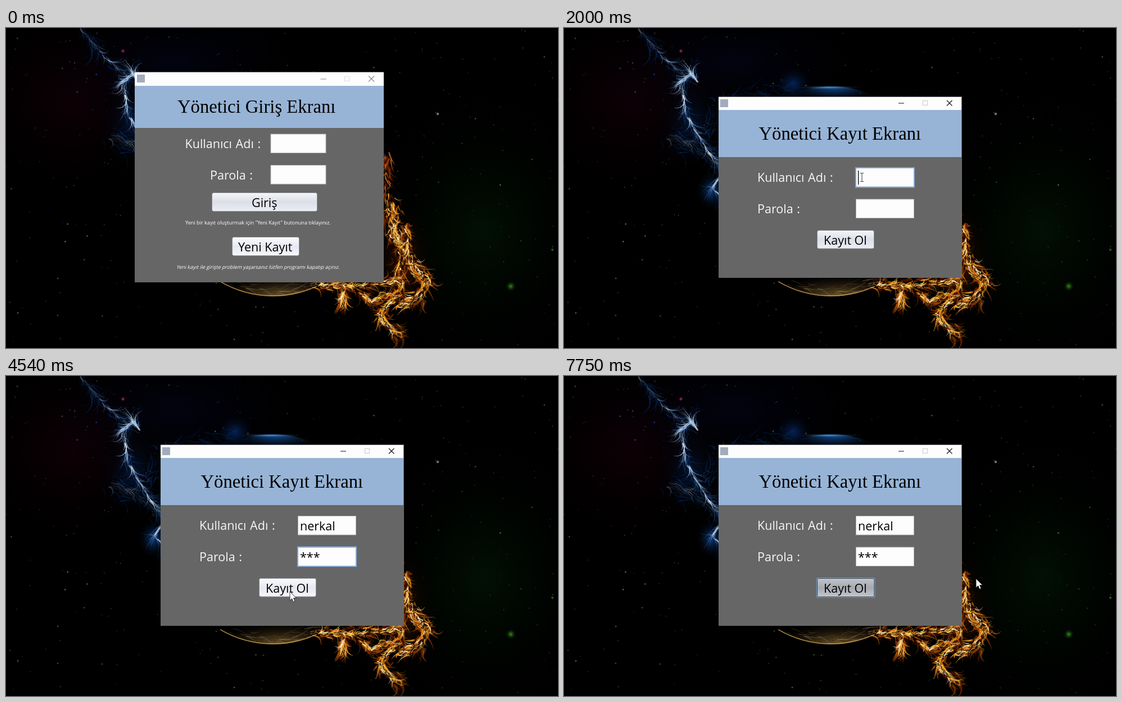
Animation, 982 px wide and 570 px high, one loop 8000 ms. Source, as an HTML page with a canvas:

```html
<!DOCTYPE html>
<html lang="tr">
<head>
<meta charset="utf-8">
<title>Yönetici Ekranı</title>
<style>
html, body { margin: 0; width: 100%; height: 100%; overflow: hidden; background: #000; }
canvas, svg { position: absolute; left: 0; top: 0; width: 982px; height: 570px; }
text { font: 21.5px "Open Sans", "Noto Sans", sans-serif; fill: #000; white-space: pre; }
.label { fill: #f6f6f6; word-spacing: 1px; }
.title { font: 32.7px "Liberation Serif", serif; }
.note { font-size: 9.15px; fill: #fff; word-spacing: 0; }
.slant { font-size: 8.93px; }
.bar { fill: #fdfdfd; }
.panel { fill: #666; }
.head { fill: #97b4d6; }
.field { fill: #fdfdfd; stroke: #b4b6bc; }
.ring { fill: none; stroke: #86a9d6; stroke-width: 2; }
.btn { fill: url(#btn); stroke: #888b95; }
.lit { fill: url(#lit); }
.icon { fill: #a2acbc; }
.sign { fill: none; stroke: #111; stroke-width: 1.1; }
.dim { stroke: #ccc; }
.login .sign { stroke: #85859a; }
.login .dim { stroke: #ddd; }

.login, .signup, .ring, .hover, .focus, .arrow, .beam { animation: 8s step-end infinite; }
.login { animation-name: login; }
.signup { animation-name: signup; }
.ring.name { animation-name: name; }
.ring.pass { animation-name: pass; }
.hover { animation-name: hover; }
.focus { animation-name: focus; }
.arrow { animation-name: arrow; }
.beam { animation-name: beam; }
.pointer { animation: move 8s linear infinite; }
@keyframes login { 0% { visibility: visible } 11%, 100% { visibility: hidden } }
@keyframes signup { 0% { visibility: hidden } 11%, 100% { visibility: visible } }
@keyframes name { 0% { visibility: hidden } 11% { visibility: visible } 41.5%, 100% { visibility: hidden } }
@keyframes pass { 0% { visibility: hidden } 41.5% { visibility: visible } 58%, 100% { visibility: hidden } }
@keyframes hover { 0% { visibility: hidden } 53.7% { visibility: visible } 58%, 100% { visibility: hidden } }
@keyframes focus { 0% { visibility: hidden } 58%, 100% { visibility: visible } }
@keyframes arrow { 0% { visibility: hidden } 11.5% { visibility: visible } 13.1% { visibility: hidden } 51.5%, 100% { visibility: visible } }
@keyframes beam { 0% { visibility: hidden } 13.1% { visibility: visible } 51.5%, 100% { visibility: hidden } }
@keyframes move {
  0%, 11.5% { transform: translate(480px, 384px) }
  13.4%, 34.4% { transform: translate(530px, 266px) }
  37.5%, 38.6% { transform: translate(550px, 256px) }
  41.5%, 50% { transform: translate(560px, 322px) }
  54.5%, 65% { transform: translate(505px, 384px) }
  68.25%, 68.7% { transform: translate(545px, 386px) }
  71.9%, 100% { transform: translate(733px, 361px) }
}
</style>
</head>
<body>
<canvas id="space" width="982" height="570"></canvas>
<svg viewBox="0 0 982 570">
  <defs>
    <linearGradient id="btn" x2="0" y2="1">
      <stop stop-color="#f5f5f8"/><stop offset=".5" stop-color="#dcdfe8"/><stop offset="1" stop-color="#eceef4"/>
    </linearGradient>
    <linearGradient id="lit" x2="0" y2="1">
      <stop stop-color="#fcfcfd"/><stop offset=".5" stop-color="#e6e8f1"/><stop offset="1" stop-color="#f7f7fb"/>
    </linearGradient>
    <linearGradient id="grey" x2="0" y2="1">
      <stop stop-color="#c3c5c8"/><stop offset=".5" stop-color="#a6a9b0"/><stop offset="1" stop-color="#c4c6ca"/>
    </linearGradient>
  </defs>

  <g class="login">
    <rect class="panel" x="229" y="78" width="443" height="375"/>
    <rect class="bar" x="229" y="79" width="443" height="24"/>
    <rect class="head" x="229" y="103" width="443" height="75"/>
    <rect class="icon" x="233" y="83" width="14" height="14"/>
    <path class="sign" d="M559.500 91h10M645 85.500l10 10m0-10l-10 10"/>
    <rect class="sign dim" x="602.500" y="86.500" width="8" height="8"/>
    <text class="title" x="305" y="151">Yönetici Giriş Ekranı</text>
    <text class="label" x="318.500" y="214">Kullanıcı Adı :</text>
    <text class="label" x="363" y="270">Parola :</text>
    <rect class="field" x="471" y="189" width="98" height="33.500"/>
    <rect class="field" x="471" y="244.500" width="98" height="33.500"/>
    <rect class="btn" x="366.500" y="293.500" width="187" height="33" rx="3"/>
    <text x="437" y="319">Giriş</text>
    <text class="label note" x="319" y="350">Yeni bir kayıt oluşturmak için "Yeni Kayıt" butonuna tıklayınız.</text>
    <rect class="btn lit" x="402.500" y="372.500" width="119" height="33" rx="3"/>
    <text x="413" y="398">Yeni Kayıt</text>
    <text class="label note slant" transform="translate(303 429) skewX(-14)">Yeni kayıt ile girişte problem yaşarsanız lütfen programı kapatıp açınız.</text>
  </g>

  <g class="signup">
    <rect class="panel" x="275" y="122" width="433" height="323"/>
    <rect class="bar" x="275" y="123" width="432" height="23"/>
    <rect class="head" x="275" y="146" width="432" height="84"/>
    <rect class="icon" x="278" y="127" width="14" height="14"/>
    <path class="sign" d="M595 134h10M681 129l9.500 9.500m0-9.500l-9.500 9.500"/>
    <rect class="sign dim" x="638.500" y="129.500" width="8" height="8"/>
    <text class="title" x="346.500" y="199">Yönetici Kayıt Ekranı</text>
    <text class="label" x="344" y="274">Kullanıcı Adı :</text>
    <text class="label" x="344" y="330">Parola :</text>
    <rect class="field" x="519.500" y="249.500" width="103" height="33.500"/>
    <rect class="field" x="519.500" y="305" width="103" height="33.500"/>
    <rect class="btn" x="450.500" y="360.500" width="101" height="32.500" rx="3"/>
  </g>
  <rect class="ring name" x="519" y="249" width="104" height="34.500"/>
  <rect class="ring pass" x="519" y="304.500" width="104" height="34.500"/>
  <rect class="btn lit hover" x="450.500" y="360.500" width="101" height="32.500" rx="3"/>
  <g class="focus">
    <rect x="449" y="359" width="104.500" height="36" rx="4" fill="#7fa6cf"/>
    <rect x="450.500" y="360.500" width="101.500" height="33" rx="3" fill="url(#grey)" stroke="#26384e"/>
  </g>
  <text class="signup" x="462" y="386">Kayıt Ol</text>
  <text id="user" x="523" y="275"></text>
  <text id="secret" x="523" y="330"></text>
  <rect id="caret" width="1.300" height="25"/>

  <g class="pointer">
    <path class="arrow" d="M0 0v16l3.700-3.400 2.500 5.800 2.800-1.200-2.500-5.600h5z" fill="#fff" stroke="#222" stroke-width=".9"/>
    <path class="beam" d="M-3-7.500h2.500l.5.500.500-.500h2.500M0-7v14M-3 7.500h2.500l.5-.500.500.500h2.500" fill="none" stroke="#333"/>
  </g>
</svg>
<script>
const ctx = document.getElementById('space').getContext('2d');
let seed = 11;
const rand = () => (seed = (seed * 16807) % 2147483647) / 2147483647;
const jitter = s => (rand() + rand() - 1) * s;
const pick = list => list[Math.floor(rand() * list.length)];

function glow(x, y, rx, ry, color, alpha) {
  ctx.save();
  ctx.translate(x, y);
  ctx.scale(rx, ry);
  const g = ctx.createRadialGradient(0, 0, 0, 0, 0, 1);
  g.addColorStop(0, color);
  g.addColorStop(1, 'transparent');
  ctx.globalAlpha = alpha;
  ctx.fillStyle = g;
  ctx.fillRect(-1, -1, 2, 2);
  ctx.restore();
}

// Position and heading at t (0 to 1) on a polyline
function along(pts, t) {
  const s = t * (pts.length - 1), i = Math.min(Math.floor(s), pts.length - 2);
  const [x, y] = pts[i], dx = pts[i + 1][0] - x, dy = pts[i + 1][1] - y;
  return { x: x + dx * (s - i), y: y + dy * (s - i), angle: Math.atan2(dy, dx) };
}

// Short curling strokes scattered around a spine
function wisps(pts, { count, spread, length, width, tones, alpha, turn = .8 }) {
  ctx.lineCap = 'round';
  for (let n = 0; n < count; n++) {
    let { x, y, angle } = along(pts, rand());
    x += jitter(spread);
    y += jitter(spread);
    angle += jitter(turn);
    const curl = jitter(.5), step = length * (.4 + rand()) / 6, w = width * (.4 + rand());
    ctx.strokeStyle = pick(tones);
    ctx.globalAlpha = alpha * (.4 + .6 * rand());
    for (let k = 0; k < 6; k++) {
      ctx.lineWidth = w * (1 - k / 7);
      ctx.beginPath();
      ctx.moveTo(x, y);
      x += Math.cos(angle) * step;
      y += Math.sin(angle) * step;
      ctx.lineTo(x, y);
      ctx.stroke();
      angle += curl;
    }
  }
}

function fire(pts, spread, count) {
  wisps(pts, { count, spread: spread * 1.4, length: 20, width: 4, tones: ['#3a1000', '#702800', '#a84a04'], alpha: .6 });
  wisps(pts, { count, spread, length: 18, width: 2.6, tones: ['#1c0800', '#b85808', '#e88a14', '#f8b030'], alpha: .8 });
  wisps(pts, { count: count * .6, spread: spread * .8, length: 14, width: 1.8, tones: ['#ffd050', '#ffe890', '#fff6d0'], alpha: .85 });
}

function smoke(pts, spread, count, bright) {
  wisps(pts, { count, spread: spread * 2, length: 32, width: 2.5, tones: ['#041838', '#082a60', '#0c3c88'], alpha: .4 });
  wisps(pts, { count, spread, length: 28, width: 1, tones: ['#2a5a98', '#5a90c8', '#88b4dc'], alpha: .5 * bright, turn: .5 });
  wisps(pts, { count: count * bright, spread: spread * .5, length: 26, width: 1.6, tones: ['#a8cce8', '#e4f2ff'], alpha: .6 * bright, turn: .3 });
}

function planet() {
  const x = 475, y = 291, r = 187;
  ctx.save();
  ctx.beginPath();
  ctx.arc(x, y, r, 0, 7);
  ctx.clip();
  glow(480, 100, 95, 34, '#1c70d8', 1);
  glow(490, 485, 130, 50, '#a07a38', 1);
  wisps([[400, 455], [480, 472], [560, 455]],
    { count: 50, spread: 14, length: 40, width: 1.2, tones: ['#1c1408', '#b0905a', '#786448'], alpha: .6, turn: .2 });
  ctx.restore();
  glow(470, 106, 65, 4, '#58b0ff', .8);
  ctx.globalAlpha = .8;
  ctx.lineWidth = 1.5;
  ctx.strokeStyle = '#e0b050';
  ctx.beginPath();
  ctx.arc(x, y, r - 1, 1.05, 2.1);
  ctx.stroke();
}

function stars() {
  const tones = ['#9090b8', '#4858e8', '#c0b030', '#b0b0b0', '#50a050', '#d8d850'];
  for (let i = 0; i < 330; i++) {
    const r = rand() < .15 ? 2.4 : 1.3;
    glow(rand() * 982, rand() * 565, r, r, pick(tones), .5 + rand() * .5);
  }
  glow(208, 41, 5, 5, '#d83070', 1);
  glow(768, 153, 4, 4, '#d8dcff', 1);
  glow(898, 460, 10, 10, '#38901c', 1);
  glow(972, 395, 4, 4, '#38a038', 1);
}

function space() {
  ctx.fillStyle = '#000';
  ctx.fillRect(0, 0, 982, 570);
  glow(120, 130, 210, 190, '#1c000c', .5);
  glow(300, 60, 260, 120, '#040620', .5);
  glow(850, 360, 220, 260, '#021404', .8);
  stars();
  planet();

  glow(408, 100, 36, 34, '#0a3890', .6);
  glow(225, 170, 60, 90, '#04183c', .7);
  glow(262, 290, 28, 36, '#0c50b0', .7);
  smoke([[130, 0], [176, 52], [214, 84]], 5, 40, .5);
  smoke([[238, 98], [226, 82], [208, 96], [216, 150], [244, 204], [282, 256]], 6, 90, 1);
  smoke([[182, 192], [225, 206], [275, 240]], 14, 50, .4);
  smoke([[276, 266], [264, 284], [278, 300]], 4, 16, 1);
  smoke([[250, 200], [285, 130], [400, 105]], 12, 40, .15);

  glow(705, 420, 60, 120, '#401400', .7);
  wisps([[678, 225], [680, 300]], { count: 50, spread: 9, length: 20, width: 2, tones: ['#601800', '#a83a08', '#e07820'], alpha: .7 });
  fire([[684, 308], [690, 360], [712, 410], [752, 452]], 17, 130);
  fire([[712, 348], [714, 400]], 5, 26);
  fire([[752, 444], [735, 480], [700, 492]], 12, 45);
  fire([[700, 410], [700, 470], [664, 514], [698, 546]], 11, 85);
  fire([[550, 457], [625, 459], [700, 450]], 9, 80);
  fire([[600, 465], [600, 496]], 8, 24);
  fire([[628, 470], [650, 488], [684, 470]], 7, 36);
}
space();

const LOOP = 8000, BLINK = 500;
const OPENED = 750, NEXT_FIELD = 3320, CLICKED = 4640;
const fields = [
  { el: document.getElementById('user'), value: 'nerkal', first: 2080, gap: 100, from: OPENED, top: 254 },
  { el: document.getElementById('secret'), value: '***', first: 3540, gap: 200, from: NEXT_FIELD, top: 309 }
];
const caret = document.getElementById('caret');
let start;

function frame(now) {
  start ??= now;
  const t = (now - start) % LOOP;
  for (const f of fields) {
    f.count = Math.max(0, Math.min(f.value.length, Math.floor((t - f.first) / f.gap) + 1));
    f.el.textContent = f.value.slice(0, f.count);
  }
  const f = fields[t < NEXT_FIELD ? 0 : 1];
  const last = f.count ? f.first + (f.count - 1) * f.gap : f.from;
  const shown = t >= 880 && t < CLICKED && Math.floor((t - last) / BLINK) % 2 === 0;
  caret.setAttribute('visibility', shown ? 'visible' : 'hidden');
  caret.setAttribute('x', 523 + (f.count ? f.el.getComputedTextLength() : 0));
  caret.setAttribute('y', f.top);
  requestAnimationFrame(frame);
}
requestAnimationFrame(frame);
</script>
</body>
</html>
```
